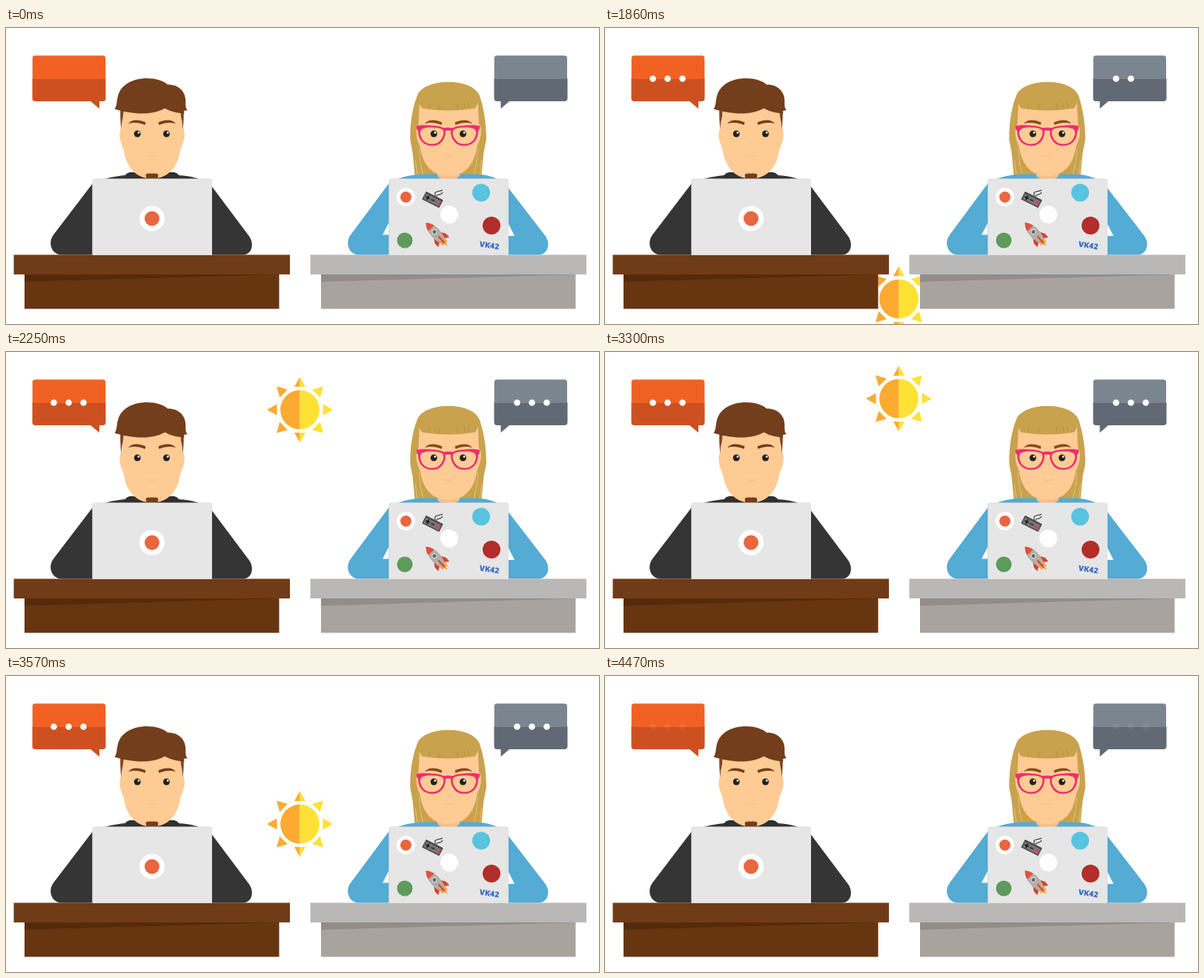
Write an HTML page that moves like this. It is 800x400 px and loops after 4500 ms.

```html
<!DOCTYPE html>
<html lang="en">
<head>
<meta charset="utf-8">
<title>Two developers chatting</title>
<style>
  html, body { margin: 0; width: 100%; height: 100%; overflow: hidden; background: #fff; }
  svg { display: block; width: 100vw; height: 100vh; }
  .tag { font: 800 10.5px "Open Sans", sans-serif; fill: #3c6dc4; }
</style>
</head>
<body>
<svg viewBox="0 0 800 400">
  <defs>
    <clipPath id="west"><rect x="-50" y="-50" width="50" height="100"/></clipPath>
    <clipPath id="east"><rect x="0" y="-50" width="50" height="100"/></clipPath>
    <g id="sunShape"><circle r="26.4"/></g>

    <path id="head" fill="#fecb95" d="M158 100L156.500 134C152.500 137 153 149 155.500 156C156.500 160 158 161 159 166C162.500 188 175 203.500 197 203.500C219 203.500 231.500 188 235 166C236 161 237.500 160 238.500 156C241.500 149 242 137 238 134L236.500 100Z"/>
    <path id="brow" d="M165 129.500C169 123.500 178 123 188.500 127.500L187.500 131C180 128 172 127 165 129.500Z"/>
    <g id="brows">
      <use href="#brow"/>
      <use href="#brow" transform="matrix(-1 0 0 1 394 0)"/>
    </g>
    <g id="eye">
      <circle r="4.5" fill="#222"/>
      <circle cx="1.7" cy="-1.6" r="1.4" fill="#fff"/>
    </g>
    <g id="features">
      <use href="#eye" x="177.200" y="143"/>
      <use href="#eye" x="216.500" y="143"/>
      <path d="M189 172.500Q197 175 205 172.500" fill="none" stroke="#f4bd88"/>
    </g>
    <path id="lens" fill="none" stroke="#ec2f6e" stroke-width="2.600" d="M557.500 136C560 132 583 132 590 136.500C594.500 140 590 158 575 158C561 158 556.500 147 557.500 136Z"/>
    <path id="corner" fill="#ec2f6e" d="M553.500 132.500C560 130.500 568 131 575 132L561 136.500L558.500 141L554.500 137.500Z"/>
    <path id="strands" fill="none" stroke="#e2c27c" d="M552.500 178Q553 190 555 198M557.500 163Q558.500 185 563 198"/>
    <g id="laptop">
      <rect x="116.300" y="203.500" width="161.700" height="105" rx="4" fill="#d9d9d9"/>
      <rect x="117" y="204" width="160.500" height="105" rx="3.500" fill="#e6e6e6"/>
    </g>
    <path id="shadow" d="M25 333H368.500L25 343Z"/>
  </defs>

  <rect width="800" height="400" fill="#fff"/>

  <g id="sun">
    <g fill="#fdaa31" clip-path="url(#west)"><use href="#sunShape"/></g>
    <g fill="#ffe135" clip-path="url(#east)"><use href="#sunShape"/></g>
  </g>

  <!-- speech bubbles -->
  <path fill="#cd5120" d="M35.500 68H134.500V95Q134.500 99 130.500 99H126V109L114 99H39.500Q35.500 99 35.500 95Z"/>
  <path fill="#f26124" d="M35.700 69V41Q35.700 37.300 39.400 37.300H130.500Q134.300 37.300 134.300 41V69Z"/>
  <path fill="#616974" d="M658.500 68H757.500V95Q757.500 99 753.500 99H679L667.500 109V99H662.500Q658.500 99 658.500 95Z"/>
  <path fill="#7b858f" d="M658.700 69V41Q658.700 37.300 662.400 37.300H753.300Q757 37.300 757 41V69Z"/>
  <g id="dots" fill="#fff"></g>

  <!-- man -->
  <path fill="#353535" d="M116.500 210.500L64 279.500C55.500 291 62 306.500 75 306.500H319C332 306.500 335 292 328.500 282L278 214.500C268 205 254 200.500 233 199L160 199C144 200.500 126 205 116.500 210.500Z"/>
  <path fill="#303030" d="M160 200C162 196.500 166 194 171 195H223C228 194 232 196.500 234 200V206H160Z"/>
  <use href="#head"/>
  <path fill="#7d4523" d="M154.500 106H159L158 119Q156 127 155.500 137.500Q153.500 120 154.500 106ZM239.500 106H235L236 119Q238 127 238.500 137.500Q240.500 120 239.500 106Z"/>
  <path fill="#733e1c" d="M146.500 109.500C150 105 149 99 151 92C155 76 172 68 190 68C202 68 212 71 218 76.500C232 76 242 85 242.300 98C242.300 104 242 109 245 111L240 112L240.500 115.500C231 115 222 113 214.500 108.500C206 113 196 115.500 184 115.500C171 115.500 158 113 146.500 109.500Z"/>
  <use href="#brows" fill="#733e1c"/>
  <use href="#features"/>
  <path fill="#733e1c" d="M188.500 199Q190 195.500 193 197Q195 195.500 197 197Q199 195.500 201 197Q204 195.500 205.500 199L204 206H190Z"/>
  <rect x="25" y="333" width="343.500" height="46.500" fill="#673510"/>
  <use href="#shadow" fill="#552a0b"/>
  <use href="#laptop"/>
  <circle cx="197" cy="257.500" r="17" fill="#fff"/>
  <circle cx="197" cy="257.500" r="10" fill="#e9663f"/>
  <path fill="#703b17" d="M10.500 306.500H116.300V307H278V306.500H383V333H10.500Z"/>

  <!-- woman -->
  <path fill="#c9a24e" d="M597 73C576 73 559 80 555 91C548 108 545 130 545.300 151L548.500 168L551.500 199H641.500L644.500 168L648 151C648 130 645 108 638.500 91C634 80 618 73 597 73Z"/>
  <use href="#strands"/>
  <use href="#strands" transform="matrix(-1 0 0 1 1194 0)"/>
  <path fill="#54abd3" d="M516.500 210L465 279.500C456.500 291 463 306.500 476 306.500H718C731 306.500 735 292 728 281.500L678 216.500C668 203 651 198 634 197.500H560C543 198.500 527 203 516.500 210Z"/>
  <path fill="#fff" d="M516.500 263L508 279.500H516.500ZM677.500 264L686 281H677.500Z"/>
  <path fill="#f4c08a" d="M582 194H612V200Q606 206 597 206Q588 206 582 200Z"/>
  <use href="#head" x="400" y="-3.500"/>
  <path fill="#c9a24e" d="M554 95C557 83 575 73 597 73C619 73 637 83 640 95L633 108.500Q615 111.500 597 111.500Q579 111.500 561 108.500Z"/>
  <path fill="none" stroke="#b48e3f" stroke-width=".8" d="M570 109L572 101M585 110V102M609 110V102M619 109L618 101M625 109L623 100"/>
  <use href="#brows" x="400" fill="#8a4b20"/>
  <use href="#lens"/>
  <use href="#lens" transform="matrix(-1 0 0 1 1193 0)"/>
  <use href="#corner"/>
  <use href="#corner" transform="matrix(-1 0 0 1 1193 0)"/>
  <path d="M589.500 137.500Q596.500 135.500 603.500 137.500" fill="none" stroke="#ec2f6e" stroke-width="4"/>
  <use href="#features" x="400"/>
  <use href="#laptop" x="400"/>

  <!-- stickers -->
  <circle cx="539.500" cy="228.500" r="12.500" fill="#fff"/>
  <circle cx="539.500" cy="228.500" r="7.500" fill="#e9663f"/>
  <circle cx="598" cy="252" r="12" fill="#fff"/>
  <circle cx="641" cy="222.500" r="12" fill="#58c4df"/>
  <circle cx="655" cy="267" r="12" fill="#b32d2a"/>
  <circle cx="538" cy="287" r="10.500" fill="#5f9a5d"/>
  <path d="M579 227C577 219 584 222 589 219M581 228C580 224 587 227 589 222" fill="none" stroke="#444" stroke-width="1.200"/>
  <g transform="translate(575.500 232) rotate(27)">
    <rect x="-13" y="-6" width="26" height="12" rx="1" fill="#4a4a4c"/>
    <rect x="-11.500" y="-3.500" width="23" height="8" fill="#77787a"/>
    <path d="M-10 .5H-4M-7 -2.500V3.500" stroke="#222" stroke-width="2"/>
    <path d="M-2 .5H3" stroke="#333" stroke-width="2"/>
    <circle cx="6" cy="1" r="1.700" fill="#d9473e"/>
    <circle cx="10" cy="1" r="1.700" fill="#d9473e"/>
  </g>
  <g transform="translate(582 280) rotate(-42)">
    <path fill="#f5a43a" d="M-5 9L-4 16L-1 14L0 21L2 14L4 17L5 9Z"/>
    <path fill="#d8402f" d="M-5 -2L-10 6V13L-4 9ZM5 -2L10 6V13L4 9ZM-2 8H2L0 17Z"/>
    <path fill="#b6ada3" d="M0 -23C8 -15 8 0 4.500 10H-4.500C-8 0 -8 -15 0 -23Z"/>
    <path fill="#e2503f" d="M0 -23Q4.500 -18.500 5.500 -12.500H-5.500Q-4.500 -18.500 0 -23Z"/>
    <circle cy="-6" r="3" fill="#566b7d" stroke="#e8e2da"/>
    <path d="M0 2V11" stroke="#d8402f" stroke-width="2"/>
  </g>
  <text class="tag" x="652" y="297.500" text-anchor="middle" transform="rotate(8 652 294)">VK42</text>

  <rect x="425" y="333" width="343.500" height="46.500" fill="#a8a39f"/>
  <use href="#shadow" x="400" fill="#928c8a"/>
  <path fill="#b9b8b7" d="M410.500 306.500H516.300V307H678V306.500H783V333H410.500Z"/>
</svg>

<script>
const NS = "http://www.w3.org/2000/svg";
const LOOP = 4500, STEP = 30;
const RISE_END = 2246, FALL_START = 3280, TRAVEL = 440;
const FADE_START = 4050, FADE = 450;
const $ = id => document.getElementById(id);

function add(parent, name, attrs) {
  const el = parent.appendChild(document.createElementNS(NS, name));
  for (const key in attrs) el.setAttribute(key, attrs[key]);
  return el;
}

for (let i = 0; i < 8; i++) {
  add($("sunShape"), "path", { d: "M0 -44.500L7.500 -31H-7.500Z", transform: `rotate(${i * 45})` });
}

const dots = [150, 480, 840].flatMap((at, i) =>
  [[64.5, at], [689.5, at + 1140]].map(([x, start]) => ({
    start, el: add($("dots"), "circle", { cx: x + 20 * i, cy: 68.5, r: 4.3 })
  })));

// Height below the resting place: a short hop up, then a drop.
const drop = u => u * (-374.6 + u * (993.6 - 219 * u));

function sunY(t) {
  const away = Math.max(0, RISE_END - t, t - FALL_START) / TRAVEL;
  return away > 1 ? 500 : 78 + drop(away);
}

function draw(ms) {
  const t = Math.floor((ms % LOOP) / STEP) * STEP;
  $("sun").setAttribute("transform", `translate(396.5 ${sunY(t).toFixed(2)})`);
  $("dots").setAttribute("opacity", Math.min(1, 1 - (t - FADE_START) / FADE));
  for (const { el, start } of dots) {
    el.setAttribute("visibility", t >= start ? "visible" : "hidden");
  }
}

const begin = performance.now();
function tick() {
  draw(performance.now() - begin);
  requestAnimationFrame(tick);
}
tick();
</script>
</body>
</html>
```
